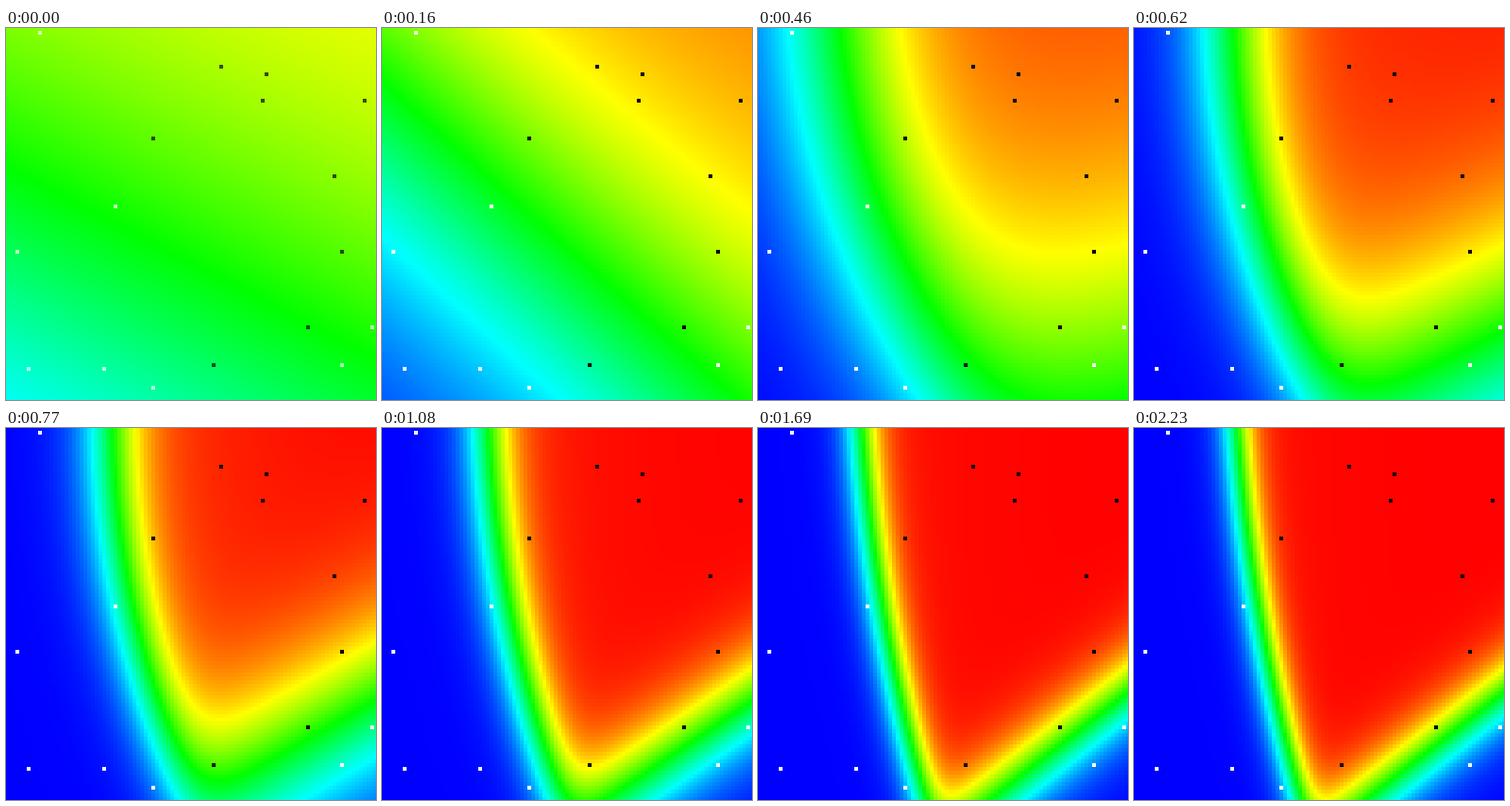
These frames come from a looping animation (392x394 px, 2.37 s). An HTML page with a canvas:

```html
<!DOCTYPE html>
<html lang="en">
<head>
<meta charset="utf-8">
<title>Learning a decision boundary</title>
<style>
  html, body { margin: 0; width: 100%; height: 100%; overflow: hidden; }
  canvas { display: block; }
</style>
</head>
<body>
<canvas id="stage" width="392" height="394"></canvas>
<script>
const ctx = document.getElementById('stage').getContext('2d');
const LOOP = 2370, STEP = 76.9, LAST = 29, CELL = 4;

const dark = [[228, 41], [276, 49], [272, 77], [380, 77], [156, 117],
  [348, 157], [356, 237], [320, 317], [220, 357]];
const light = [[36, 5], [116, 189], [12, 237], [388, 317], [356, 357],
  [24, 361], [104, 361], [156, 381]];

// Training states: step, then left edge (bias, x, y, y squared),
// lower edge (bias, x, y) and soft tail (bias, x). Slopes are per 1000 px.
const states = [
  [0,   1.02,  2.6,   -5,   0,      3.6,  0,     0,    1.5, 0],
  [2,   0.55,  6.7,   -7.2, 0,      3.2,  0,     -3,   2.4, 0],
  [6,  -1.70,  20.5,  -2,   -0.012, 3.71, -2,    -7.2, 3,   0],
  [10, -5.68,  51,    -1,   -0.026, 9.3,  -10.5, -18,  1.4, 9],
  [14, -7.08,  63,    -3,   -0.024, 17.2, -21,   -31,  1.8, 11],
  [22, -9.33,  85,    -6,   -0.022, 22.2, -29.5, -38,  2.2, 12.5],
  [29, -10.05, 92,    -6.8, -0.023, 24.5, -32.5, -42,  2.4, 13.5]
];

function weightsAt(step) {
  const next = Math.max(1, states.findIndex(s => s[0] >= step));
  const from = states[next - 1], to = states[next];
  const k = (step - from[0]) / (to[0] - from[0]);
  return from.map((v, i) => v + (to[i] - v) * k);
}

// Class probability: 0 is blue, 1 is red.
function predict(w, x, y) {
  const left = w[1] + (w[2] * x + w[3] * y + w[4] * y * y) / 1000;
  const lower = w[5] + (w[6] * x + w[7] * y) / 1000;
  const tail = w[8] + w[9] * x / 1000;
  return 1 / (1 + Math.exp(-left) + Math.exp(-lower) + Math.exp(-tail));
}

function drawDots(dots, color) {
  ctx.fillStyle = color;
  for (const [x, y] of dots) ctx.fillRect(x - 2, y - 2, CELL, CELL);
}

function draw(step) {
  const w = weightsAt(step);
  for (let y = -1; y < 394; y += CELL) {
    for (let x = -2; x < 392; x += CELL) {
      const p = predict(w, x + 2, y + 2);
      ctx.fillStyle = `hsl(${(240 * (1 - p)).toFixed(2)}, 100%, 50%)`;
      ctx.fillRect(x, y, CELL, CELL);
    }
  }
  ctx.globalAlpha = step ? 1 : 0.7;
  drawDots(dark, '#000');
  drawDots(light, '#fff');
  ctx.globalAlpha = 1;
}

const start = performance.now();
let shown = -1;

function tick() {
  const t = (performance.now() - start) % LOOP;
  const step = Math.min(LAST, Math.floor((t + 6) / STEP));
  if (step !== shown) draw(shown = step);
  requestAnimationFrame(tick);
}
tick();
</script>
</body>
</html>
```
